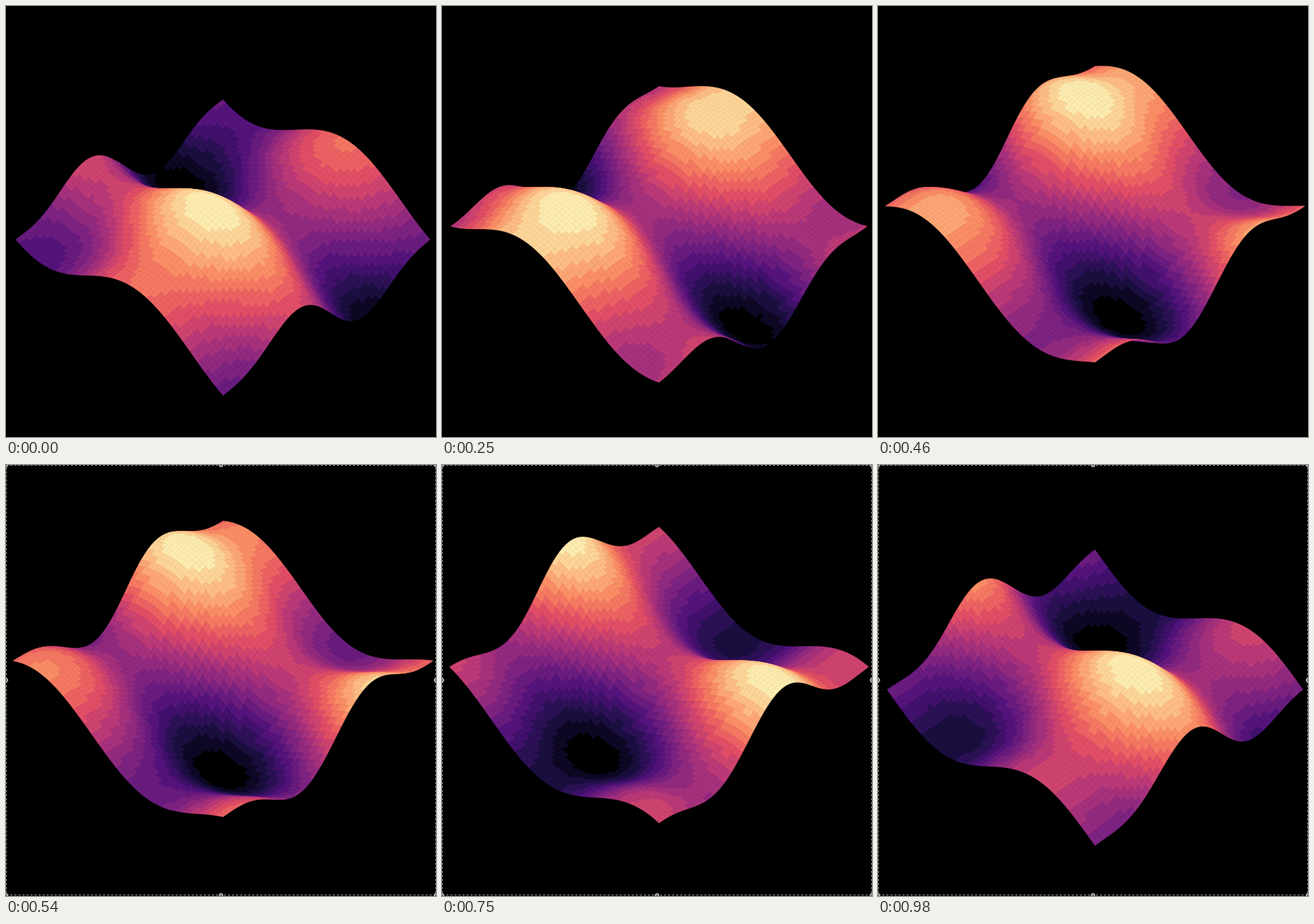
An HTML page with a canvas for the animation above (1050 ms loop, 640 by 641 pixels).

```html
<!DOCTYPE html>
<html>
<head>
<meta charset="utf-8">
<style>
html, body { margin: 0; height: 100%; overflow: hidden; background: #000; }
canvas { display: block; }
</style>
</head>
<body>
<canvas id="stage" width="640" height="641"></canvas>
<script>
const ctx = document.getElementById('stage').getContext('2d');
const LOOP = 1050, STEP = 1000 / 24, HOLD = 980, BORDER_FROM = 13;
const N = 60, LEVELS = 20, TAU = Math.PI * 2, DEG = Math.PI / 180;

// Magma colour map, evenly spaced stops
const STOPS = [[0, 0, 4], [28, 16, 68], [79, 18, 123], [129, 37, 129], [181, 54, 122],
  [229, 80, 100], [251, 135, 97], [254, 194, 135], [252, 253, 191]];

function magma(n) {
  const x = n * (STOPS.length - 1), i = Math.floor(x);
  return `rgb(${STOPS[i].map((c, k) => Math.round(c + (STOPS[i + 1][k] - c) * (x - i)))})`;
}
const PALETTE = Array.from({ length: LEVELS }, (_, i) => i ? magma((i + 0.3) / LEVELS) : '#000');

function height(a, b, s) {
  return 35 * Math.cos(TAU * a + s + 145 * DEG)
    + 35 * Math.sin(TAU * b + s) - 16 * Math.sin(2 * TAU * b + s);
}

function project(a, b, s) {
  const z = height(a, b, s), u = a + b - 1, v = a - b;
  const w = 1 - 0.0545 * v - 0.00024 * z;
  return { x: 323 + 310.5 * u / w, y: 319 + (219.4 * v - z) / w, z };
}

function drawSurface(s) {
  const grid = Array.from({ length: N + 1 }, (_, i) =>
    Array.from({ length: N + 1 }, (_, j) => project(i / N, j / N, s)));
  const heights = grid.flat().map(p => p.z);
  const low = Math.min(...heights), range = Math.max(...heights) - low;
  ctx.lineWidth = 0.6;
  // Far cells first
  for (let i = 0; i < N; i++) {
    for (let j = N - 1; j >= 0; j--) {
      const cell = [grid[i][j], grid[i + 1][j], grid[i + 1][j + 1], grid[i][j + 1]];
      const z = cell.reduce((sum, p) => sum + p.z, 0) / 4;
      const level = Math.floor((z - low) / range * LEVELS);
      ctx.fillStyle = ctx.strokeStyle = PALETTE[Math.min(level, LEVELS - 1)];
      ctx.beginPath();
      cell.forEach(p => ctx.lineTo(p.x, p.y));
      ctx.closePath();
      ctx.fill();
      ctx.stroke();
    }
  }
}

function drawBorder() {
  ctx.lineWidth = 1;
  ctx.strokeStyle = '#aaa';
  ctx.setLineDash([3, 3]);
  ctx.strokeRect(0.5, 0.5, 639, 639);
  ctx.setLineDash([]);
  ctx.fillStyle = '#777';
  ctx.strokeStyle = '#ddd';
  for (const x of [0, 320, 640]) {
    for (const y of [0, 320, 640]) {
      if (x === 320 && y === 320) continue;
      ctx.beginPath();
      ctx.arc(x, y, 2.8, 0, TAU);
      ctx.fill();
      ctx.stroke();
    }
  }
}

// The last picture comes late and is held to the end of the loop
function stepAt(t) {
  return t >= HOLD ? HOLD / STEP : Math.min(Math.floor((t + 5) / STEP), 22);
}

let shown = -1;
function frame(now) {
  const step = stepAt(now % LOOP);
  if (step !== shown) {
    shown = step;
    ctx.fillStyle = '#000';
    ctx.fillRect(0, 0, 640, 641);
    drawSurface((13.1 * step - 4) * DEG);
    if (step >= BORDER_FROM) drawBorder();
  }
  requestAnimationFrame(frame);
}
frame(performance.now());
</script>
</body>
</html>
```
